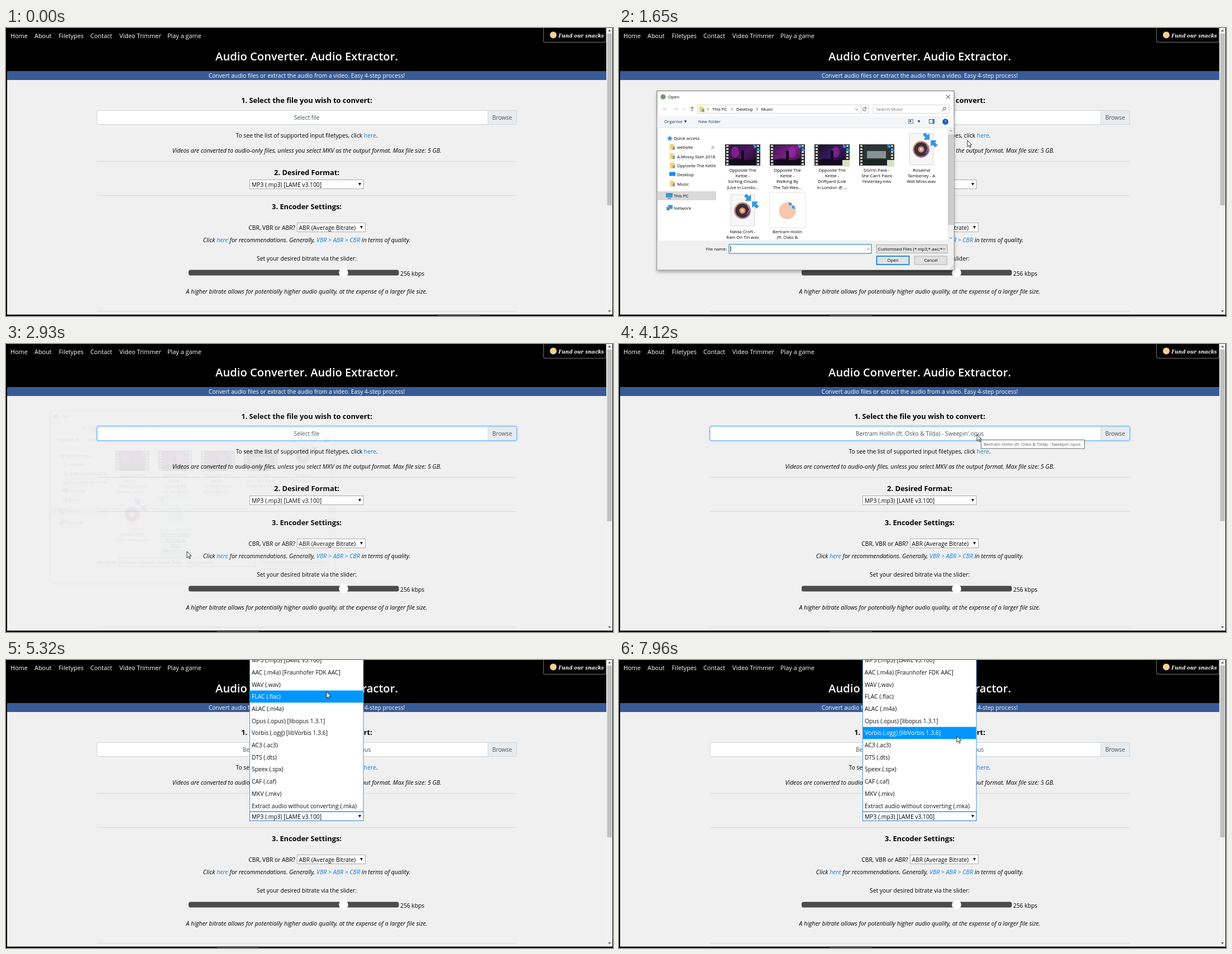
An HTML page that plays this animation: 1087x515 px, repeating every 7990 ms.

```html
<!DOCTYPE html>
<html lang="en">
<head>
<meta charset="utf-8">
<title>Audio Converter</title>
<style>
  html, body { margin: 0; width: 100%; height: 100%; overflow: hidden; background: #000; }
  svg { display: block; width: 100%; height: 100%; }
  text { font: 10.3px "Open Sans", "Noto Sans", sans-serif; white-space: pre; }
  .mid { text-anchor: middle; }
  .nav { font-size: 10.9px; fill: #fff; }
  .title { font-size: 20.2px; font-weight: 600; fill: #fff; }
  .head { font-size: 12.85px; font-weight: 700; }
  .note { font-size: 10.63px; font-style: italic; }
  .small { font-size: 7.8px; }
  .link { fill: #0d7fe8; }
  .field { fill: #495057; }
  .badge { font: italic 600 9.6px "Noto Serif", serif; fill: #fff; }
  .line { fill: none; stroke: #555; }
</style>
</head>
<body>
<svg id="stage" viewBox="0 0 1087 515" preserveAspectRatio="none"></svg>
<script>
const LOOP = 7990;
const SONG = "Bertram Hollin (ft. Osko &amp; Tilda) - Sweepin'.opus";
const FORMATS = ['MP3 (.mp3) [LAME v3.100]', 'AAC (.m4a) [Fraunhofer FDK AAC]', 'WAV (.wav)',
  'FLAC (.flac)', 'ALAC (.m4a)', 'Opus (.opus) [libopus 1.3.1]', 'Vorbis (.ogg) [libVorbis 1.3.6]',
  'AC3 (.ac3)', 'DTS (.dts)', 'Speex (.spx)', 'CAF (.caf)', 'MKV (.mkv)',
  'Extract audio without converting (.mka)'];
const ROW = 21.7, ROW_TOP = -10.55;

// Pointer stops: time, x, y
const POINTER = [
  [100, 1010, 520], [650, 690, 161], [950, 690, 161], [1430, 624, 201], [1650, 624, 201],
  [2150, 312, 345], [2370, 312, 345], [2680, 324, 371], [2960, 324, 371], [3400, 648, 160],
  [3630, 648, 160], [3950, 637, 161], [4120, 641, 162], [4440, 642, 161], [4720, 605, 322],
  [4900, 575, 281], [4990, 575, 281], [5220, 568, 112], [5320, 574, 57], [5520, 580, 6],
  [5950, 582, 22], [6290, 582, 22], [6490, 584, 44], [6700, 584, 44], [7100, 590, 89],
  [7310, 590, 89], [7450, 597, 105], [7610, 597, 105], [7710, 605, 126], [7920, 605, 126],
  [7960, 605, 136]];

// Drawing helpers
const text = (x, y, s, cls = '', more = '') => `<text x="${x}" y="${y}" class="${cls}" ${more}>${s}</text>`;
const rect = (x, y, w, h, fill, more = '') =>
  `<rect x="${x}" y="${y}" width="${w}" height="${h}" fill="${fill}" ${more}/>`;
const box = (x, y, w, h, fill, stroke, more = '') => rect(x + .5, y + .5, w - 1, h - 1, fill, `stroke="${stroke}" ${more}`);
const path = (d, fill, more = '') => `<path d="${d}" fill="${fill}" ${more}/>`;
const line = (d, more = '') => `<path d="${d}" class="line" ${more}/>`;
const disc = (x, y, r, fill) => `<circle cx="${x}" cy="${y}" r="${r}" fill="${fill}"/>`;
const group = (id, s, more = '') => `<g id="${id}" ${more}>${s}</g>`;
const down = (x, y, w = 5, fill = '#111') => path(`M${x - w / 2} ${y - w / 2}h${w}l${-w / 2} ${w}z`, fill);
const chevron = (x, y, more = '') => line(`M${x - 2.5} ${y - 1.2}l2.5 2.5l2.5 -2.5`, more);
const link = s => `<tspan class="link">${s}</tspan>`;

function page() {
  const nav = [[8, 'Home'], [51, 'About'], [94.5, 'Filetypes'], [151, 'Contact'], [203, 'Video Trimmer'], [289, 'Play a game']];
  return rect(2, 93, 1073, 419.5, '#f0f0f0') + rect(2, 77, 1073, 16, '#385b96')
    + nav.map(([x, s]) => text(x, 18, s, 'nav')).join('')
    + text(538.5, 57.5, 'Audio Converter. Audio Extractor.', 'title mid')
    + text(538.5, 89, 'Convert audio files or extract the audio from a video. Easy 4-step process!', 'mid', 'fill="#fff"')
    + box(962, -4, 113, 30, '#000', '#555', 'rx="3" stroke-width="1.5"')
    + disc(980, 12.5, 6, '#f3cf94') + text(1030, 16.5, 'Fund our snacks', 'badge mid')
    + rect(1075, 0, 11, 512.5, '#f1f1f1') + rect(1076.5, 10, 8.5, 307, '#c1c1c1')
    + path('M1078 6l2.7 -3l2.7 3z', '#555') + path('M1078 505l2.7 3l2.7 -3z', '#555')
    + [238, 299, 506].map(y => rect(163, y, 752, 1, '#dadada')).join('')
    + text(538.5, 133.5, '1. Select the file you wish to convert:', 'head mid')
    + box(162.5, 147, 752.5, 26, '#fff', '#ced4da', 'rx="3"')
    + path('M863 147.5h49a2.5 2.5 0 0 1 2.5 2.5v20a2.5 2.5 0 0 1 -2.5 2.5h-49z', '#e9ecef', 'stroke="#ced4da"')
    + group('ring', box(161.5, 146, 754.5, 28, 'none', '#b4d5f8', 'rx="4" stroke-width="2"')
      + box(162.5, 147, 752.5, 26, 'none', '#80bdff', 'rx="3"'))
    + text(538.5, 164, 'Select file', 'mid field', 'id="chosen"') + text(888.5, 164, 'Browse', 'mid field')
    + text(538.5, 195.5, `To see the list of supported input filetypes, click ${link('here')}.`, 'mid')
    + text(538.5, 223, 'Videos are converted to audio-only files, unless you select MKV as the output format. Max file size: 5 GB.', 'note mid')
    + text(538.5, 262.5, '2. Desired Format:', 'head mid')
    + box(436, 271, 204.5, 17, '#fff', '#a9a9a9', 'id="select"') + text(440, 284, FORMATS[0]) + down(633.5, 279.5)
    + text(538.5, 324, '3. Encoder Settings:', 'head mid')
    + text(518, 361, 'CBR, VBR or ABR?', '', 'text-anchor="end"')
    + box(521, 348, 123, 17, '#fff', '#a9a9a9') + text(524.5, 361, 'ABR (Average Bitrate)') + down(636.5, 356.5)
    + text(538.5, 383, `Click ${link('here')} for recommendations. Generally, ${link('VBR &gt; ABR &gt; CBR')} in terms of quality.`, 'note mid')
    + text(538.5, 415.5, 'Set your desired bitrate via the slider:', 'mid')
    + rect(327, 432.5, 376.5, 10, '#4b4b4b', 'rx="3.5"') + disc(604.5, 437.5, 8.3, '#fff')
    + text(706, 442.5, '256 kbps')
    + text(538.5, 475, 'A higher bitrate allows for potentially higher audio quality, at the expense of a larger file size.', 'note mid')
    + rect(773, 512.5, 76, 2.5, '#3c3c3c', 'id="task"');
}

const label = (x, y, lines) => lines.map((s, i) => text(x, y + 10.2 * i, s, 'small mid')).join('');
const arrows = (x, y, k) => `<g transform="translate(${x} ${y}) scale(${k})">`
  + ['', 'rotate(180 13 13)'].map(r => path('M0 4L4 0L8.5 4.5L12 1.5V12.5H1.5L4.5 8.5z', '#3399e6', `transform="${r}"`)).join('') + '</g>';

function film(x, scene, badge) {
  const holes = [4, 59].map(dx => line(`M${x + dx} 209.5V246`, 'style="stroke:#ddd;stroke-width:4" stroke-dasharray="3 2.4"')).join('');
  return rect(x, 208, 63, 38, '#2b2b2b') + holes + scene + arrows(x + 50, 208, .5)
    + (badge ? rect(x + 50, 236, 13, 12, '#d9dfc8') : '');
}
const concert = (x, light, glow) => rect(x + 8, 209, 47, 36, `url(#${light})`)
  + `<ellipse cx="${x + glow}" cy="222" rx="7" ry="10" fill="#a02aa8" opacity=".6"/>`
  + rect(x + 29, 219, 5, 20, '#160a20', 'rx="2"') + path(`M${x + 8} 245v-9q12 -5 23 -1t24 -3v13z`, '#140a1c');

const record = (x, y) => box(x, y, 43, 57, '#f7f7f7', '#d5d5d5') + disc(x + 21, y + 29, 15, 'url(#vinyl)')
  + disc(x + 21, y + 29, 12.5, '#33313a') + disc(x + 21, y + 29, 5.5, '#f08a70') + disc(x + 21, y + 29, 2, '#fff')
  + line(`M${x + 30} ${y + 20}l4 7l-5 9`, 'style="stroke:#d8a0a0"') + arrows(x + 24, y - 1, 1.02);

function fileList() {
  const band = 'Opposite The';
  return film(190, concert(190, 'dimLight', 18), false) + label(221.5, 257, [band, 'Kettle -', 'Sorting Clouds', '(Live in Londo...'])
    + film(270, concert(270, 'pinkLight', 40), false) + label(301.5, 257, [band, 'Kettle -', 'Walking By', 'The Tall Wee...'])
    + film(350, concert(350, 'blueLight', 38), true) + label(381.5, 257, [band, 'Kettle -', 'Driftyard (Live', 'in London @ ...'])
    + film(430, rect(438, 209, 47, 36, '#2b3634') + rect(444, 220, 34, 13, '#87938f') + rect(438, 235, 47, 10, '#1d2524'), true)
    + label(461.5, 257, ['Dorrin Pask -', "She Can't Paint", 'Yesterday.mkv'])
    + record(520, 188) + label(541.5, 257, ['Rosalind', 'Tamberley - A', 'Wet Moss.wav'])
    + record(200, 297.5) + label(221.5, 367, ['Nelda Croft -', 'Rain On Tin.wav'])
    + box(269, 293.5, 65, 64, '#fff', '#e4e4e4') + disc(301.5, 327, 15, '#f6c6ad') + arrows(303, 311, .5)
    + group('picked', box(268, 293, 66, 108, '#cce8ff', '#99d1ff', 'fill-opacity=".6"')
      + box(271, 295, 8, 8, '#fff', '#333') + line('M273 299l1.5 2l3 -4'))
    + group('songLabel', label(301.5, 367, ['Bertram Hollin', '(ft. Osko &amp;', 'Tilda) -', "Sweepin'.opus"]));
}

function dialog() {
  const folder = (x, y) => path(`M${x} ${y}h6l1.5 2h2v8.5h-9.5z`, '#f6d475') + rect(x + 5, y + 5, 4, 5, '#62a5dc');
  const side = [[104, 216, 'website'], [104, 232.5, 'A.Mossy.Stair.2018.'], [104, 249, 'Opposite The Kettle'],
    [104, 265, 'Desktop'], [104, 281.5, 'Music']];
  const grey = 'style="stroke:#c4c4c4"';
  const button = (x, s, main) => box(x, 407.5, 59, 16, '#e1e1e1', main ? '#0078d7' : '#adadad', main ? 'stroke-width="1.6"' : '')
    + text(x + 29.5, 418.3, s, 'small mid');
  return rect(68, 112, 532, 321, '#fff', 'filter="url(#shadow)"') + box(67.5, 112, 533, 321, '#fff', '#777')
    + disc(79, 123, 4.6, '#6f9c68') + text(88, 126, 'Open', 'small') + line('M586 119.5l7 7m0 -7l-7 7', 'style="stroke:#222"')
    + line('M86 145h-7m3 -3l-3 3l3 3M98 145h7m-3 -3l3 3l-3 3', grey) + chevron(117, 145, grey)
    + line('M131 149v-8m-3 3l3 -3l3 3')
    + box(140, 137, 307, 16, '#fff', '#d9d9d9') + folder(143.5, 140) + line('M433 137v16', 'style="stroke:#d9d9d9"')
    + [159, 202, 247].map(x => line(`M${x - 1} 142.5l2.2 2.5l-2.2 2.5`)).join('')
    + text(167, 147.5, 'This PC', 'small') + text(210, 147.5, 'Desktop', 'small') + text(254.5, 147.5, 'Music', 'small')
    + chevron(425.5, 145.5) + line('M442 143.5a3 3 0 1 0 .5 2.5m0 -4.5v2.5h-2.5')
    + box(454.5, 137, 137, 16, '#fff', '#d9d9d9') + text(460.5, 148, 'Search Music', 'small', 'fill="#6d6d6d"')
    + '<circle cx="583" cy="144" r="2.4" class="line"/>' + line('M581 146l-3 3')
    + rect(68.5, 157, 531, 21, '#f5f6f7') + rect(68.5, 178, 531, 1, '#e5e5e5')
    + text(81, 170, 'Organise', 'small', 'fill="#1e395b"') + down(119, 167.5, 4.5, '#1e395b')
    + text(142, 170, 'New folder', 'small', 'fill="#1e395b"')
    + box(518, 163, 9, 8, '#e8eef4', '#6c8199') + rect(520, 165, 3, 3, '#346ca5') + down(537, 167.5, 4.5, '#1e395b')
    + box(555, 163, 10, 8, '#fff', '#456') + rect(561, 164, 3, 6, '#4a9adf')
    + disc(584.5, 167.5, 5.3, '#0d63b3') + text(584.5, 170.4, '?', 'small mid', 'fill="#fff" font-weight="700"')
    + rect(68.5, 292, 105.5, 16, '#d9d9d9')
    + '<g clip-path="url(#sideClip)">' + path('M91 192l1.5 3.5l3.8 .3l-2.9 2.5l.9 3.7l-3.3 -2l-3.3 2l.9 -3.7l-2.9 -2.5l3.8 -.3z', '#3b93dc')
    + text(98, 200, 'Quick access', 'small') + side.map(([x, y, s], i) => i == 3
      ? rect(90, y - 7.5, 11, 7, '#1c8fe3') : folder(91, y - 8.5)).join('') + side.map(([x, y, s]) => text(x, y, s, 'small')).join('')
    + line('M165 217l3 -3m-1 -4l4 4m-5 -2l4 4', 'style="stroke:#888"')
    + rect(84, 295, 12, 8, '#3a98da') + rect(87, 304, 6, 1.5, '#777') + text(98, 303, 'This PC', 'small')
    + rect(88, 316.5, 8, 7, '#3a98da') + rect(85, 320, 6, 6, '#6d8fa8') + text(98, 324.5, 'Network', 'small') + '</g>'
    + '<g clip-path="url(#listClip)">' + group('files', fileList()) + '</g>'
    + rect(588.5, 179, 11, 201, '#f0f0f0') + rect(589, 190, 10, 162, '#cdcdcd', 'id="thumb"')
    + line('M591.5 185.5l2.5 -2.5l2.5 2.5') + chevron(594, 375.5)
    + rect(68.5, 380, 531, 52.5, '#f0f0f0') + text(193, 398, 'File name:', 'small', 'text-anchor="end"')
    + box(196.5, 386.5, 256, 17, '#fff', '#0078d7') + group('caret', rect(199.5, 390, 1, 10, '#000'))
    + group('fileName', text(199.5, 398, SONG, 'small')) + chevron(446.5, 395.5)
    + box(460.5, 387, 128, 16, '#e1e1e1', '#adadad') + text(463.5, 398, 'Customised Files (*.mp3;*.aac;*', 'small') + chevron(582, 395)
    + button(461, 'Open', true) + button(529, 'Cancel', false)
    + line('M598 426l-5 5m5 -2l-2 2', 'style="stroke:#aaa"');
}

const menu = () => rect(436.5, -1, 203.5, 272, '#fff', 'stroke="#4a93d6"')
  + rect(437, 0, 202.5, ROW, '#0096ff', 'id="hilite"')
  + FORMATS.map((s, i) => text(440, 4.1 + ROW * i, s, 'option')).join('');

const gradient = (id, stops) => `<linearGradient id="${id}" x2="1" y2="1">`
  + stops.map((c, i) => `<stop offset="${i / (stops.length - 1)}" stop-color="${c}"/>`).join('') + '</linearGradient>';

const stage = document.getElementById('stage');
stage.innerHTML = '<defs>' + gradient('dimLight', ['#3a1148', '#4c1760', '#1d0a28'])
  + gradient('pinkLight', ['#4a1458', '#7c1f86', '#2a0d38']) + gradient('blueLight', ['#1a1030', '#3a1a60', '#120a20'])
  + gradient('vinyl', ['#f3a05f', '#8b5aa8'])
  + `<clipPath id="listClip">${rect(176, 179, 412, 201, '#000')}</clipPath>`
  + `<clipPath id="sideClip">${rect(69, 179, 104, 201, '#000')}</clipPath>`
  + '<filter id="shadow" x="-5%" y="-5%" width="110%" height="112%"><feDropShadow dx="0" dy="3" stdDeviation="3" flood-opacity=".35"/></filter></defs>'
  + rect(0, 0, 1087, 515, '#000') + page() + group('dialog', dialog()) + group('menu', menu())
  + group('tip', box(648, 171, 186, 16.5, '#fff', '#666') + text(653, 182, SONG, 'small', 'fill="#575757"'))
  + group('pointer', path('M0 0V11.2L2.6 8.8L4.4 12.9L6.2 12.1L4.4 8.1H8z', '#fff', 'stroke="#000" stroke-width=".8"'));

const el = id => document.getElementById(id);
const options = [...document.querySelectorAll('.option')];
const songLines = [...el('songLabel').children];
const show = (id, on) => el(id).setAttribute('visibility', on ? 'inherit' : 'hidden');
const ramp = (t, a, b) => Math.min(1, Math.max(0, (t - a) / (b - a)));

function pointerAt(t) {
  const next = POINTER.findIndex(p => p[0] > t);
  if (next < 1) return (next ? POINTER[POINTER.length - 1] : POINTER[0]).slice(1);
  const [a, b] = [POINTER[next - 1], POINTER[next]];
  const k = ramp(t, a[0], b[0]), ease = k * k * (3 - 2 * k);
  return [1, 2].map(i => a[i] + (b[i] - a[i]) * ease);
}

function draw(t) {
  const [x, y] = pointerAt(t);
  el('pointer').setAttribute('transform', `translate(${x} ${y})`);
  el('task').setAttribute('x', t < 780 ? 773 : 377);

  const open = Math.min(ramp(t, 780, 930), 1 - ramp(t, 2820, 2945));
  el('dialog').setAttribute('opacity', open ** 1.3);
  el('dialog').setAttribute('transform', `translate(333 273) scale(${.953 + .047 * open}) translate(-333 -273)`);
  show('dialog', open > 0);

  const picked = t >= 2200;
  ['picked', 'fileName'].forEach(id => show(id, picked));
  show('caret', !picked);
  el('files').setAttribute('transform', `translate(0 ${picked ? -21 : 0})`);
  el('thumb').setAttribute('y', picked ? 203 : 190);
  songLines.forEach(s => s.setAttribute('text-decoration', picked ? 'underline' : 'none'));

  el('ring').setAttribute('opacity', Math.min(ramp(t, 2820, 2920), 1 - ramp(t, 4900, 5050)));
  el('chosen').innerHTML = t < 2970 ? 'Select file' : SONG;
  el('tip').setAttribute('opacity', Math.min(ramp(t, 3480, 3600), 1 - ramp(t, 4460, 4560)));

  const listed = t >= 4960;
  show('menu', listed);
  el('select').setAttribute('stroke', listed ? '#2f7fd0' : '#a9a9a9');
  const hovered = Math.floor((y - ROW_TOP) / ROW), row = hovered < FORMATS.length ? hovered : 0;
  el('hilite').setAttribute('y', ROW_TOP + ROW * row);
  options.forEach((o, i) => o.setAttribute('fill', i == row ? '#fff' : '#111'));
}

function tick() {
  draw(performance.now() % LOOP);
  requestAnimationFrame(tick);
}
tick();
</script>
</body>
</html>
```
